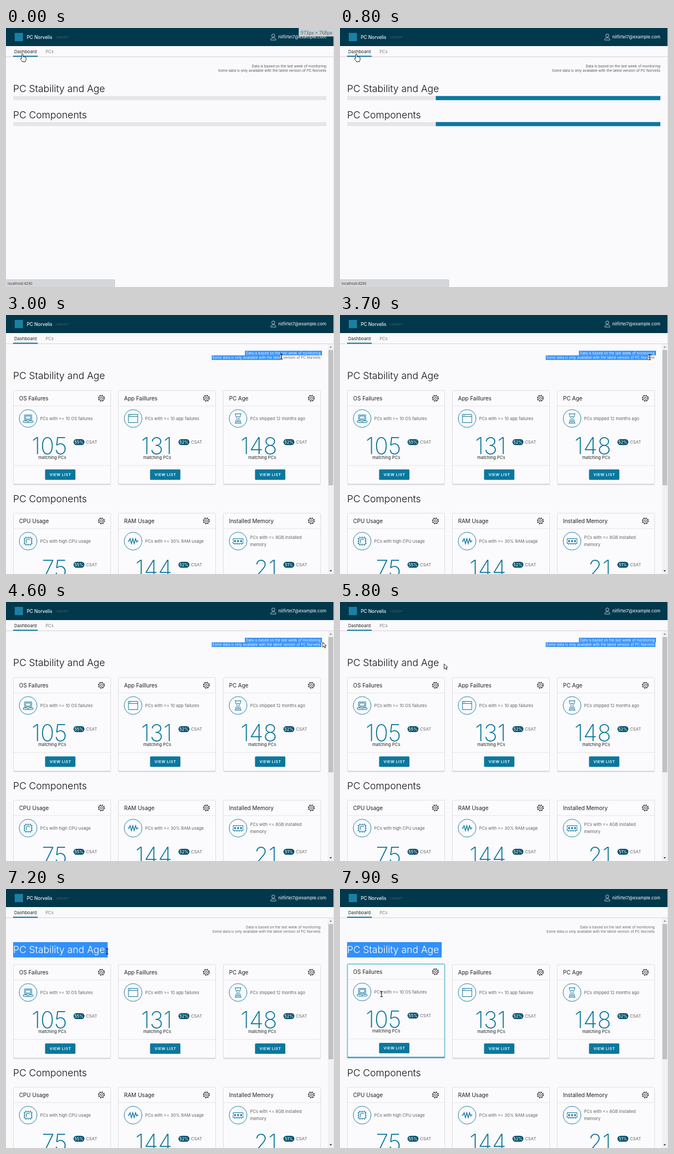
An HTML page for the animation above (8 s loop, 600 by 473 pixels).

```html
<!DOCTYPE html>
<html lang="en">
<head>
<meta charset="utf-8">
<title>PC dashboard</title>
<style>
html, body { margin: 0; width: 600px; height: 473px; overflow: hidden; background: #faf9fb; }
svg { position: absolute; left: 0; top: 0; width: 600px; height: 473px; }
text { font-family: Inter, sans-serif; font-feature-settings: "calt" 0; white-space: pre; }
.os { font-family: "Open Sans", sans-serif; }
.line { fill: none; stroke: #0a759c; }

.tip, .loading, .status, .loaded, .hand, .arrow, .ibeam, .glow, .lift { animation: 8s step-end infinite; }
.tip { animation-name: tip; }
.loading { animation-name: loading; }
.status { animation-name: status; }
.loaded { animation-name: loaded; }
.hand { animation-name: hand; }
.arrow { animation-name: arrow; }
.ibeam { animation-name: ibeam; }
.glow { animation-name: glow; }
.lift { animation-name: lift; }
@keyframes tip { 0% { opacity: 1 } 1.25%, 100% { opacity: 0 } }
@keyframes loading { 0% { opacity: 1 } 12.5%, 100% { opacity: 0 } }
@keyframes status { 0% { opacity: 1 } 15%, 100% { opacity: 0 } }
@keyframes loaded { 0% { opacity: 0 } 12.5%, 100% { opacity: 1 } }
@keyframes hand { 0% { opacity: 1 } 13.75%, 100% { opacity: 0 } }
@keyframes arrow {
  0%, 27.5%, 76.25%, 98.75%, 100% { opacity: 0 }
  13.75%, 53.75%, 96.25% { opacity: 1 }
}
@keyframes ibeam {
  0%, 53.75%, 96.25% { opacity: 0 }
  27.5%, 76.25%, 98.75%, 100% { opacity: 1 }
}
@keyframes glow { 0% { opacity: 0 } 97.5%, 100% { opacity: 1 } }
@keyframes lift { 0% { transform: none } 97.5%, 100% { transform: translateY(-1px) } }

.bar { animation: bar 8s infinite; }
@keyframes bar {
  0% { transform: translateX(-497px); animation-timing-function: cubic-bezier(.38, .2, .68, .63) }
  10%, 100% { transform: translateX(161.5px) }
}

.row1 { animation: row1 8s step-end infinite; }
.row2 { animation: row2 8s step-end infinite; }
.head { animation: head 8s step-end infinite; }
@keyframes row1 {
  0% { clip-path: inset(0 600px 0 0) }
  28.75% { clip-path: inset(0 163px 0 0); animation-timing-function: steps(4) }
  33.75% { clip-path: inset(0 130px 0 0) }
  35% { clip-path: inset(0 22px 0 0) }
  77.5%, 100% { clip-path: inset(0 600px 0 0) }
}
@keyframes row2 {
  0% { clip-path: inset(0 600px 0 0) }
  35% { clip-path: inset(0 120px 0 0); animation-timing-function: steps(2) }
  37.5% { clip-path: inset(0 98px 0 0); animation-timing-function: steps(6) }
  45% { clip-path: inset(0 45px 0 0); animation-timing-function: steps(2) }
  47.5% { clip-path: inset(0 27px 0 0) }
  51.25% { clip-path: inset(0 23px 0 0) }
  77.5%, 100% { clip-path: inset(0 600px 0 0) }
}
@keyframes head {
  0% { clip-path: inset(0 600px 0 0) }
  77.5% { clip-path: inset(0 587px 0 0); animation-timing-function: steps(4) }
  82.5% { clip-path: inset(0 492px 0 0); animation-timing-function: steps(2) }
  85% { clip-path: inset(0 441px 0 0); animation-timing-function: steps(2) }
  87.5% { clip-path: inset(0 418px 0 0); animation-timing-function: steps(2) }
  90%, 100% { clip-path: inset(0 414px 0 0) }
}

.cursor { animation: cursor 8s step-end infinite; }
@keyframes cursor {
  0% { transform: translate(30px, 48px) }
  12.5% { transform: translate(30px, 48px); animation-timing-function: steps(2) }
  15% { transform: translate(110px, 50px); animation-timing-function: steps(3) }
  18.75% { transform: translate(350px, 66px); animation-timing-function: steps(2) }
  21.25% { transform: translate(421px, 63px) }
  22.5% { transform: translate(421px, 63px); animation-timing-function: steps(4) }
  27.5% { transform: translate(437px, 70px) }
  28.75% { transform: translate(437px, 70px); animation-timing-function: steps(4) }
  33.75% { transform: translate(470px, 70px) }
  35% { transform: translate(482px, 75px); animation-timing-function: steps(2) }
  37.5% { transform: translate(504px, 76px); animation-timing-function: steps(6) }
  45% { transform: translate(558px, 77px); animation-timing-function: steps(2) }
  47.5% { transform: translate(575px, 77px) }
  53.75% { transform: translate(579px, 73px) }
  65% { transform: translate(579px, 73px); animation-timing-function: steps(3) }
  68.75% { transform: translate(400px, 100px); animation-timing-function: steps(5) }
  75% { transform: translate(50px, 121px); animation-timing-function: steps(1) }
  76.25% { transform: translate(13px, 112px) }
  77.5% { transform: translate(13px, 112px); animation-timing-function: steps(4) }
  82.5% { transform: translate(121px, 108px); animation-timing-function: steps(2) }
  85% { transform: translate(162px, 111px); animation-timing-function: steps(2) }
  87.5% { transform: translate(184px, 114px) }
  90% { transform: translate(185px, 114px) }
  95% { transform: translate(185px, 114px); animation-timing-function: steps(3) }
  98.75%, 100% { transform: translate(76px, 192px) }
}
</style>
</head>
<body>
<script>
const text = (x, y, s, size, fill, more = '') =>
  `<text x="${x}" y="${y}" font-size="${size}" fill="${fill}" ${more}>${s.replace(/</g, '&lt;')}</text>`;
const rect = (x, y, w, h, fill, more = '') =>
  `<rect x="${x}" y="${y}" width="${w}" height="${h}" fill="${fill}" ${more}/>`;
const path = (d, more = '') => `<path d="${d}" ${more}/>`;
const group = (cls, body) => `<g class="${cls}">${body}</g>`;
const layer = (cls, body) => `<svg class="${cls}" viewBox="0 0 600 473">${body}</svg>`;

const END = 'text-anchor="end"', MID = 'text-anchor="middle"';
const BLUE = '#0a789e', INK = '#0a759c', SELECT = '#3390fa';
const product = 'PC Norvelis';
const notes = ['Data is based on the last week of monitoring',
  `Some data is only available with the latest version of ${product}`];
const titles = ['PC Stability and Age', 'PC Components'];

const note = (i, right, fill) => text(right, i ? 80 : 71.5, notes[i], 6.5, fill, END);
const title = (i, y, fill) => text(13, y, titles[i], 17.8, fill, 'font-weight="300"');

const icons = {
  laptop: path('M-6.5 3V-6.5H6.5V3ZM-4.5 1V-4.5H4.5V1ZM-9 4.5H-2.5L-1.5 5.7H1.5L2.5 4.5H9V6.5Q9 7.5 8 7.5H-8Q-9 7.5-9 6.5Z'),
  app: path('M-8.5-7.5H8.5V7.5H-8.5ZM-8.5-3.7H8.5M-6.8-5.6H-5.8M-4.6-5.6H-3.6'),
  glass: path('M-6-8.5H6M-6 8.5H6M-4.5-8.5V-5.5Q-4.5-3-1 0Q-4.5 3-4.5 5.5V8.5M4.5-8.5V-5.5Q4.5-3 1 0Q4.5 3 4.5 5.5V8.5M-2.5-3.5H2.5M0 2L-2.8 6H2.8Z'),
  cpu: path('M-6-6H6V6H-6ZM-3 3.5V-3H3.5M-4-6V-8.5M0-6V-8.5M4-6V-8.5M-4 6V8.5M0 6V8.5M4 6V8.5M-6-4H-8.5M-6 0H-8.5M-6 4H-8.5M6-4H8.5M6 0H8.5M6 4H8.5'),
  wave: path('M-9.5 0H-7.5L-5.5-4.5L-3 4.5L-.5-4.5L2 4.5L4.5-4.5L6.5 1.5L7.3 0H9.5', 'stroke-width="1.3"'),
  ram: path('M-9-4.5H9V-1.5Q7.5-.5 9 .5V4.5H-9V.5Q-7.5-.5-9-1.5Z') +
    path('M-5.5-2V2M0-2V2M5.5-2V2', 'stroke-width="2.4"') + path('M-6 4.5V6.5M-2 4.5V6.5M2 4.5V6.5M6 4.5V6.5'),
};

const gear = '<g transform="translate(161 14)" fill="none" stroke="#222">' +
  '<circle r="4.5" stroke-width=".9"/><circle r="2" stroke-width=".9"/>' +
  '<circle r="5.4" stroke-width="1.5" stroke-dasharray="2.1 2.14"/></g>';

function card([name, icon, desc, count, csat], i) {
  const x = 13.5 + 192 * (i % 3), y = i < 3 ? 138 : 362;
  const lines = desc.split('\n');
  const top = lines.length > 1 ? 47 : 53.5;
  const glow = i ? '' : group('glow', rect(0, 0, 178, 170.5, 'none', 'stroke="#1ba3cb" rx="1.5"') +
    rect(-.5, 169.5, 179, 2.2, '#1ba3cb', 'rx="1"'));
  const body = rect(0, 1.5, 178, 171, '#d8d7d9', 'rx="1.5"') +
    rect(0, 0, 178, 170.5, '#fbfafc', 'stroke="#dcdbdd" stroke-width=".9" rx="1.5"') +
    rect(0, 27.7, 178, .8, '#dedde0') + rect(0, 136.5, 178, .8, '#dedde0') +
    text(10.5, 17.5, name, 10, '#222') + gear +
    `<g class="line" transform="translate(27 51)"><circle r="16.3" stroke-width=".9"/>${icons[icon]}</g>` +
    lines.map((s, n) => text(49, top + 13 * n, s, 7.7, '#636363')).join('') +
    text(98.5, 115.5, count, 42, INK, END + ' font-weight="200"') +
    text(96.5, 124.5, 'matching PCs', 7.8, '#222', END) +
    rect(110, 88.7, 20, 10.8, '#004d68', 'rx="5.4"') +
    text(120, 96.8, csat, 7.4, '#fff', MID + ' font-weight="500"') +
    text(133, 97, 'CSAT', 7.7, '#636363') +
    rect(58, 144, 55.5, 19, BLUE, 'rx="1.6"') +
    text(86, 156, 'VIEW LIST', 6.8, '#fff', MID + ' font-weight="600" letter-spacing=".6"') + glow;
  return `<g transform="translate(${x} ${y})">${group(i ? '' : 'lift', body)}</g>`;
}

const cards = [
  ['OS Failures', 'laptop', 'PCs with >= 10 OS failures', '105', '55%'],
  ['App Faillures', 'app', 'PCs with >= 10 app failures', '131', '52%'],
  ['PC Age', 'glass', 'PCs shipped 12 months ago', '148', '52%'],
  ['CPU Usage', 'cpu', 'PCs with high CPU usage', '75', '55%'],
  ['RAM Usage', 'wave', 'PCs with >= 30% RAM usage', '144', '52%'],
  ['Installed Memory', 'ram', 'PCs with <= 8GB installed\nmemory', '21', '51%'],
];

const header = rect(0, 0, 599.3, 33, '#01384c') +
  rect(16, 9, 15, 15, '#1b7fa3') +
  text(38, 19.5, product, 8.4, '#f2f6f8', 'font-weight="500"') +
  text(91, 18.5, 'CONCEPT', 5, '#4d6673') +
  '<g fill="none" stroke="#c5d5dc" stroke-width=".9"><circle cx="489" cy="13.8" r="2.9"/>' +
  path('M484.3 22V20.5Q485 17.8 489 17.8T493.7 20.5V22Z') + '</g>' +
  text(586, 18.8, 'nilfirtel7@example.com', 7.8, '#dbe5ea', END + ' font-weight="500"') +
  rect(0, 52.2, 599.3, .9, '#cfced1') +
  text(15, 46, 'Dashboard', 8, '#222') + rect(13, 50.6, 45, 2, BLUE) +
  text(72.5, 46, 'PCs', 7.6, '#777') + rect(599.3, 0, .7, 473, '#d8d8da');

const loading = group('loading',
  note(0, 586, '#555') + note(1, 586, '#555') +
  title(0, 117, '#111') + title(1, 164.5, '#111') +
  '<clipPath id="tracks">' + rect(13.5, 124.3, 572.5, 7.5) + rect(13.5, 171.8, 572.5, 7.5) + '</clipPath>' +
  '<g clip-path="url(#tracks)">' + rect(13, 120, 574, 64, '#e6e5e7') +
  rect(13.5, 120, 429.4, 64, BLUE, 'class="bar"') + '</g>');

const loaded = group('loaded',
  note(0, 575.5, '#666') + note(1, 575.5, '#666') +
  title(0, 117, '#111') + title(1, 341.5, '#111') +
  cards.map(card).join('') +
  rect(589, 53, 10.3, 420, '#f1f0f2') + rect(589.8, 64, 8.6, 247, '#c1c0c2') +
  path('M594 56.8L596.3 59.8H591.7Z', 'fill="#8a8a8a"') + path('M594 469L596.3 466H591.7Z', 'fill="#444"'));

const status = group('status', rect(-1, 459.5, 200, 15, '#d5d6d9', 'stroke="#c3c4c7" stroke-width=".8" rx="1.5"') +
  text(3, 469.3, 'localhost:4200', 6.7, '#333', 'class="os"'));
const tip = group('tip', rect(535.5, 0, 64.5, 15.5, '#c9d1d5') +
  text(539, 11.5, '973px × 768px', 8.6, '#50585c', 'class="os"'));

const outline = 'fill="#fff" stroke="#111" stroke-width=".9" stroke-linejoin="round"';
const cursor = group('cursor',
  group('hand', path('M-1.2 7.5V.6Q-1.2-.6 0-.6T1.2.6V4.6Q2.2 3.7 3.2 4.8Q4.4 4.2 5.1 5.3Q6.8 5 6.8 6.8V9Q6.8 11 5.6 12.3V13.6H-.4V12.4Q-2.2 10.7-3.4 8.3Q-3.6 6.4-1.2 7.5Z', outline)) +
  group('arrow', path('M.4.4V9.6L2.6 7.6L4.1 11L5.7 10.3L4.2 7H7Z', outline)) +
  group('ibeam', path('M-2.4-4.8H-.6L0-4.2L.6-4.8H2.4M0-4.2V4.2M-2.4 4.8H-.6L0 4.2L.6 4.8H2.4', 'fill="none" stroke="#111" stroke-width="1.1"')));

document.body.innerHTML =
  layer('', header + loading + loaded + status + tip) +
  layer('row1', rect(437, 65.3, 141, 8.4, SELECT) + note(0, 575.5, '#fff')) +
  layer('row2', rect(376.3, 73.7, 201, 8.4, SELECT) + note(1, 575.5, '#fff')) +
  layer('head', rect(13, 97, 173, 28, SELECT) + title(0, 117, '#fff')) +
  layer('', cursor);
</script>
</body>
</html>
```
